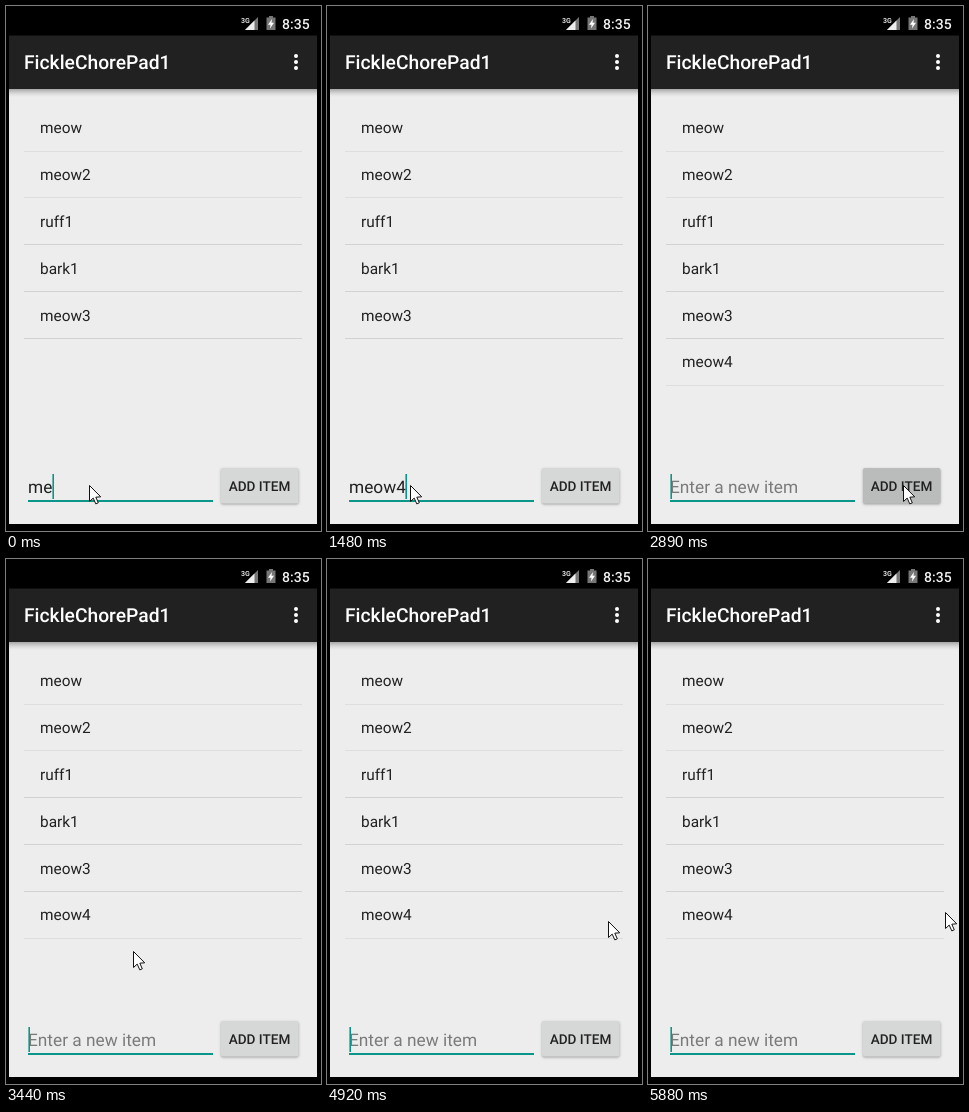
An HTML page with a canvas that plays this animation: 315x525 px, repeating every 8000 ms.

```html
<!DOCTYPE html>
<html lang="en">
<head>
<meta charset="utf-8">
<title>Todo list</title>
<style>
html, body { margin: 0; width: 100%; height: 100%; overflow: hidden; background: #000; }
canvas { display: block; width: 315px; height: 525px; }
</style>
</head>
<body>
<canvas id="stage"></canvas>
<script>
const W = 315, H = 525, LOOP = 8000, BEAT = 136.5;
const TEAL = '#0a9688', INK = '#212121', PAPER = '#ededed';
const ITEMS = ['meow', 'meow2', 'ruff1', 'bark1', 'meow3', 'meow4'];

// Moments, counted in beats.
const HOVER = 17, ADD = 21, TAP = 37;
const keyBeats = [5, 6, 9];
const caretFlips = [3, 5, 15, ADD, 22, 25, 29, 33];
const home = { x: 83, y: 479 };
const moves = [
  { from: 11, to: 14, x: 255, y: 479 },
  { from: 22, to: 24, x: 153, y: 469 },
  { from: 24, to: 27, x: 116, y: 360 },
  { from: 34, to: 36, x: 281, y: 362 },
  { from: 38, to: 43, x: 297, y: 353 }
];

const canvas = document.getElementById('stage');
const ctx = canvas.getContext('2d');
const dpr = window.devicePixelRatio || 1;
canvas.width = W * dpr;
canvas.height = H * dpr;

const clamp = v => Math.min(1, Math.max(0, v));
const mix = (a, b, p) => a + (b - a) * p;
const easeOut = p => 1 - (1 - p) ** 3;
const passed = (beats, b) => beats.filter(k => k <= b).length;
const fade = (b, start) => b < start ? 0 : clamp(1 - (b - start) / 4);

function rect(x, y, w, h, color) {
  ctx.fillStyle = color;
  ctx.fillRect(x, y, w, h);
}

function text(str, x, y, size, color = INK, weight = 400) {
  ctx.font = `${weight} ${size}px Roboto, sans-serif`;
  ctx.fillStyle = color;
  ctx.fillText(str, x, y);
}

function poly(points, color) {
  ctx.beginPath();
  for (const [x, y] of points) ctx.lineTo(x, y);
  ctx.closePath();
  ctx.fillStyle = color;
  ctx.fill();
}

function disc(x, y, r, color) {
  ctx.beginPath();
  ctx.arc(x, y, r, 0, Math.PI * 2);
  ctx.fillStyle = color;
  ctx.fill();
}

function drawStatus() {
  poly([[239, 24], [252, 24], [252, 11]], '#777');
  poly([[239, 24], [248.5, 24], [248.5, 14.5]], '#eee');
  text('3G', 235, 16.5, 7, '#ddd', 700);
  rect(263, 10, 4, 2, '#777');
  rect(260.5, 11.5, 9, 12.5, '#777');
  poly([[266, 13], [262, 18.7], [264.5, 18.7], [264, 22.5], [268, 16.8], [265.5, 16.8]], '#fff');
  text('8:35', 276, 22.5, 14, '#f2f2f2', 500);
}

function drawBar() {
  rect(3, 29.5, 308, 53.5, INK);
  const shade = ctx.createLinearGradient(0, 83, 0, 91);
  for (let p = 0; p <= 1; p += .25) shade.addColorStop(p, `rgba(0,0,0,${.3 * (1 - p) ** 1.5})`);
  rect(3, 83, 308, 8, shade);
  text('FickleChorePad1', 18, 63, 19.25, '#fff', 500);
  for (let i = 0; i < 3; i++) disc(290, 50 + 6 * i, 2, '#fff');
}

function drawRipple(b) {
  ctx.save();
  ctx.beginPath();
  ctx.rect(18.5, 333, 277, 46.5);
  ctx.clip();
  disc(157, 356, 138.7, `rgba(0,0,0,${.11 * fade(b, TAP)})`);
  ctx.restore();
}

function drawList(b) {
  const shown = ITEMS.slice(0, b < ADD ? 5 : 6);
  shown.forEach((item, i) => {
    rect(18, Math.floor(145 + i * 46.8), 278, 1, i % 5 < 2 ? '#dedede' : '#d2d2d2');
  });
  drawRipple(b);
  shown.forEach((item, i) => text(item, 34, Math.round(127.3 + i * 46.8), 15.4));
}

function drawField(b) {
  const str = b < ADD ? 'meow4'.slice(0, 2 + passed(keyBeats, b)) : '';
  text(str || 'Enter a new item', 22, 487, 17.3, str ? INK : '#7b7b7b');
  const end = Math.floor(22 + ctx.measureText(str).width);
  rect(22, 494, 185, 2, TEAL);
  if (passed(caretFlips, b) % 2 === 0) rect(end + .4, 468, 1.6, 25, TEAL);
}

function drawButton(b) {
  const raised = b >= HOVER && b < ADD;
  const press = raised ? .25 : fade(b, ADD);
  const tone = Math.round(mix(215, 187, press));
  ctx.save();
  ctx.shadowColor = `rgba(0,0,0,${raised ? .4 : .32})`;
  ctx.shadowBlur = (raised ? 5 : 2.5) * dpr;
  ctx.shadowOffsetY = (raised ? 2 : 1) * dpr;
  ctx.beginPath();
  ctx.roundRect(215, 462, 77.5, 35.5, 2);
  ctx.fillStyle = `rgb(${tone - 1},${tone},${tone})`;
  ctx.fill();
  ctx.restore();
  ctx.textAlign = 'center';
  text('ADD ITEM', 253.5, 485, 13.6, INK, 500);
  ctx.textAlign = 'left';
}

function pointerAt(b) {
  let { x, y } = home;
  for (const m of moves) {
    const p = easeOut(clamp((b - m.from) / (m.to - m.from)));
    x = mix(x, m.x, p);
    y = mix(y, m.y, p);
  }
  return [Math.round(x), Math.round(y)];
}

function drawPointer([x, y]) {
  ctx.save();
  ctx.translate(x + .5, y + .5);
  poly([[0, 0], [0, 16], [3.7, 12.6], [6.3, 18.4], [8.8, 17.3], [6.3, 11.7], [11.2, 11.3]], '#fff');
  ctx.strokeStyle = '#111';
  ctx.lineWidth = 1;
  ctx.stroke();
  ctx.restore();
}

function draw(t) {
  const b = Math.floor(t / BEAT + .17);
  ctx.setTransform(dpr, 0, 0, dpr, 0, 0);
  ctx.textRendering = 'geometricPrecision';
  rect(0, 0, W, H, '#000');
  rect(3, 83, 308, 435, PAPER);
  drawStatus();
  drawBar();
  drawList(b);
  drawField(b);
  drawButton(b);
  drawPointer(pointerAt(b));
}

const begin = performance.now();
function tick() {
  draw((performance.now() - begin) % LOOP);
  requestAnimationFrame(tick);
}
tick();
</script>
</body>
</html>
```
